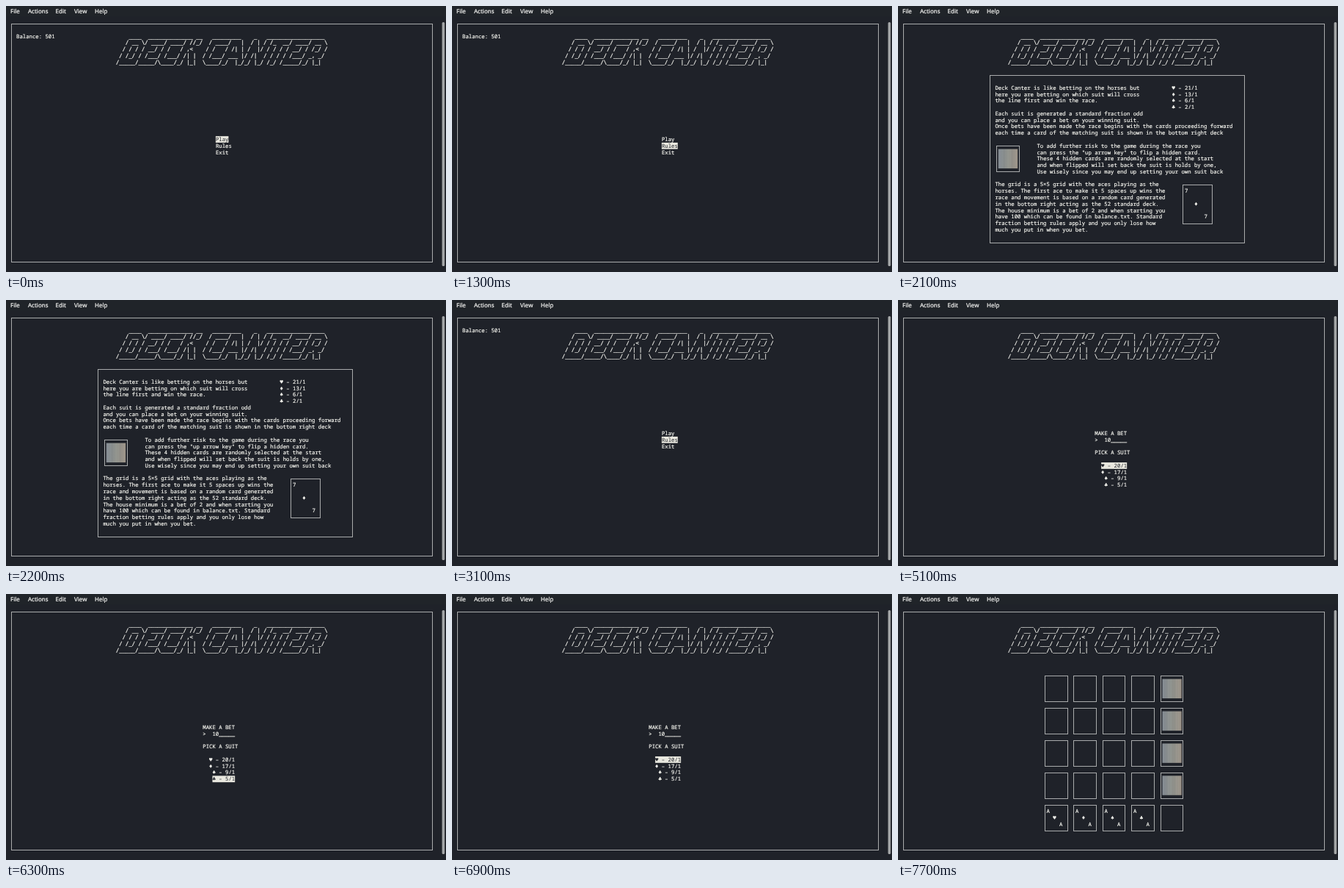
Write an HTML page that moves like this. It is 600x362 px and loops after 8000 ms.

```html
<!DOCTYPE html>
<html lang="en">
<head>
<meta charset="utf-8">
<title>Deck Canter</title>
<style>
  html, body { margin: 0; width: 100%; height: 100%; overflow: hidden; background: #1f2229; }
  svg { display: block; width: 600px; height: 362px; }
  text { white-space: pre; fill: #f4f4ee; stroke: #f4f4ee; stroke-width: .2; text-rendering: geometricPrecision; }
  .cell { font: 7.307px "Noto Sans Mono", "DejaVu Sans Mono", monospace; }
  .title { font: 7.283px "DejaVu Sans Mono", monospace; stroke-width: .25; }
  .bar { font: 500 8px "Noto Sans", "Open Sans", sans-serif; fill: #fff; }
  .box { fill: none; stroke: #a9abac; }
  .mark { fill: #e9e8df; }
  text.inverse { fill: #1f2229; stroke: none; }
</style>
</head>
<body>
<svg viewBox="0 0 600 362">
  <defs>
    <linearGradient id="shade">
      <stop offset="0" stop-color="#8c949c"/>
      <stop offset=".5" stop-color="#999c95"/>
      <stop offset="1" stop-color="#a69c90"/>
    </linearGradient>
    <pattern id="weave" width="2.2" height="4" patternUnits="userSpaceOnUse">
      <rect width=".8" height="4" fill="#1f2229" opacity=".22"/>
    </pattern>
  </defs>
  <rect width="600" height="362" fill="#1f2229"/>
  <rect width="600" height="14" fill="#202429"/>
  <rect x="594.6" y="22" width="3.6" height="332" rx="1.5" fill="#a3a5a7"/>
  <g id="frame"></g>
  <g id="screen"></g>
</svg>
<script>
// Terminal grid: cell size, left edge of column 0, centre line of row 0
const CW = 4.384, CH = 8.78, LEFT = 5.3, TOP = 23.5;
const RULE_DROP = 0.5; // box lines sit a little below the row centre
const LOOP = 8000;
const SUITS = ["♥", "♦", "♠", "♣"];
const frame = document.getElementById("frame");
const screen = document.getElementById("screen");
let layer = frame;

const colX = c => LEFT + c * CW;
const rowY = r => TOP + r * CH;
const snap = v => Math.floor(v) + 0.5;

function add(tag, attrs, content = "") {
  const el = document.createElementNS("http://www.w3.org/2000/svg", tag);
  for (const key in attrs) el.setAttribute(key, attrs[key]);
  el.textContent = content;
  layer.append(el);
}

function print(col, row, content, style = "cell") {
  add("text", { class: style, x: colX(col), y: rowY(row) + 2.45 }, content);
}

function printItem(col, row, content, selected) {
  if (selected) {
    add("rect", {
      class: "mark", x: colX(col), y: rowY(row - 0.5), width: content.length * CW, height: CH
    });
  }
  print(col, row, content, selected ? "cell inverse" : "cell");
}

const printLines = (col, row, block, style) =>
  block.split("\n").forEach((line, i) => print(col, row + i, line, style));

function box(col, row, cols, rows) {
  const x = snap(colX(col + 0.5)), y = snap(rowY(row) + RULE_DROP);
  add("rect", {
    class: "box", x, y,
    width: snap(colX(col + cols - 0.5)) - x,
    height: snap(rowY(row + rows - 1) + RULE_DROP) - y
  });
}

function cardBack(col, row) {
  box(col, row, 8, 5);
  for (const fill of ["url(#shade)", "url(#weave)"]) {
    add("rect", { x: colX(col + 1), y: rowY(row + 0.5), width: 6 * CW, height: 3 * CH, fill });
  }
}

function cardFace(col, row, cols, rows, rank, suit) {
  box(col, row, cols, rows);
  print(col + 1, row + 1, rank);
  print(col + cols / 2 - 1, row + (rows - 1) / 2, suit);
  print(col + cols - 3, row + rows - 2, rank);
}

const TITLE = String.raw`
    ____  ______________ __   _________    _   __________________
   / __ \/ ____/ ____/ //_/  / ____/   |  / | / /_  __/ ____/ __ \
  / / / / __/ / /   / ,<    / /   / /| | /  |/ / / / / __/ / /_/ /
 / /_/ / /___/ /___/ /| |  / /___/ ___ |/ /|  / / / / /___/ _, _/
/_____/_____/\____/_/ |_|  \____/_/  |_/_/ |_/ /_/ /_____/_/ |_|`.slice(1);

const INTRO = `Deck Canter is like betting on the horses but
here you are betting on which suit will cross
the line first and win the race.

Each suit is generated a standard fraction odd
and you can place a bet on your winning suit.
Once bets have been made the race begins with the cards proceeding forward
each time a card of the matching suit is shown in the bottom right deck`;

const RISK = `To add further risk to the game during the race you
can press the "up arrow key" to flip a hidden card.
These 4 hidden cards are randomly selected at the start
and when flipped will set back the suit is holds by one,
Use wisely since you may end up setting your own suit back`;

const GRID = `The grid is a 5×5 grid with the aces playing as the
horses. The first ace to make it 5 spaces up wins the
race and movement is based on a random card generated
in the bottom right acting as the 52 standard deck.
The house minimum is a bet of 2 and when starting you
have 100 which can be found in balance.txt. Standard
fraction betting rules apply and you only lose how
much you put in when you bet.`;

const oddsLine = (odds, i) => `${SUITS[i]} – ${odds}/1`;

function menu(selected) {
  print(2, 2, "Balance: 501");
  ["Play", "Rules", "Exit"].forEach((item, i) => printItem(64, 18 + i, item, i === selected));
}

function rules() {
  box(27, 8, 80, 27);
  printLines(29, 10, INTRO);
  printLines(84, 10, [21, 13, 6, 2].map(oddsLine).join("\n"));
  cardBack(29, 19);
  printLines(42, 19, RISK);
  printLines(29, 25, GRID);
  cardFace(87, 25, 10, 7, "7", "♦");
}

function bet(amount, selected, picking) {
  print(60, 18, "MAKE A BET");
  print(60, 19, ">  " + amount.padEnd(7, "_"));
  if (picking) print(60, 21, "PICK A SUIT");
  [20, 17, 9, 5].map(oddsLine).forEach((line, i) =>
    printItem(70 - line.length, 23 + i, line, i === selected));
}

function board() {
  for (let r = 0; r < 5; r++) {
    for (let c = 0; c < 5; c++) {
      const col = 44 + 9 * c, row = 10 + 5 * r;
      if (c === 4 && r < 4) cardBack(col, row);
      else if (r === 4 && c < 4) cardFace(col, row, 8, 5, "A", SUITS[c]);
      else box(col, row, 8, 5);
    }
  }
}

const pick = suit => () => bet("10", suit, true);

const STEPS = [
  [0, () => menu(0)],
  [1300, () => menu(1)],
  [2100, rules],
  [3100, () => menu(1)],
  [3400, () => menu(0)],
  [3600, () => bet("", 0)],
  [4500, () => bet("1", 0)],
  [4800, () => bet("10", 0)],
  [5100, pick(0)],
  [6000, pick(1)],
  [6100, pick(2)],
  [6300, pick(3)],
  [6500, pick(2)],
  [6700, pick(1)],
  [6900, pick(0)],
  [7700, board]
];

[["File", 6], ["Actions", 30], ["Edit", 67.6], ["View", 93], ["Help", 121]].forEach(([label, x]) =>
  add("text", { class: "bar", x, y: 10 }, label));
box(0, 0, 132, 38);
printLines(33, 2, TITLE, "title");

layer = screen;
let shown = null;
const start = performance.now();

function tick() {
  const time = Math.max(0, performance.now() - start) % LOOP;
  const draw = STEPS.findLast(([at]) => at <= time)[1];
  if (draw !== shown) {
    screen.replaceChildren();
    draw();
    shown = draw;
  }
  requestAnimationFrame(tick);
}
tick();
</script>
</body>
</html>
```
